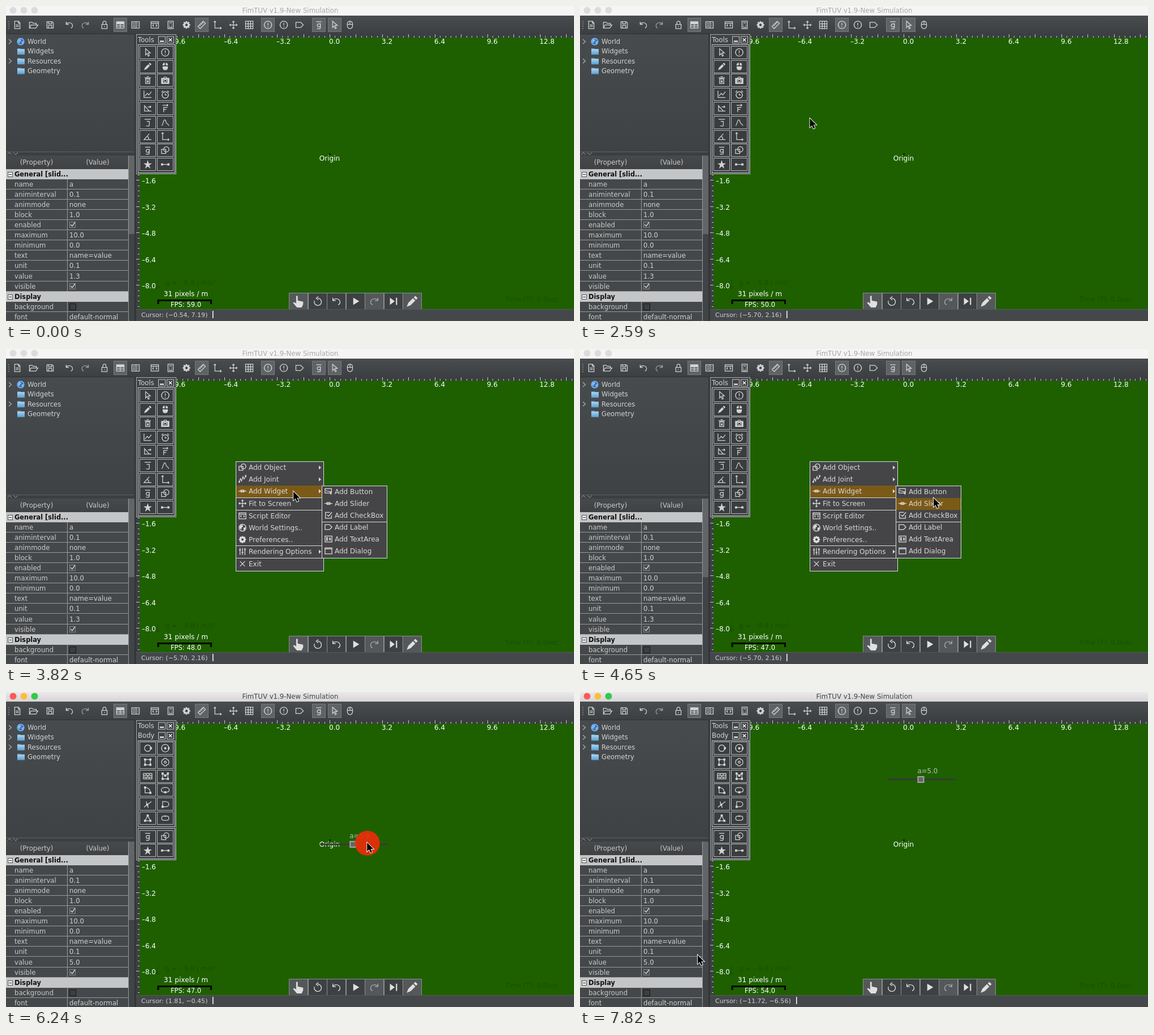
Write an HTML page with a canvas that moves like this. It is 1004 by 558 pixels and loops after 8 s.

```html
<!DOCTYPE html>
<html lang="en">
<head>
<meta charset="utf-8">
<title>Simulation editor</title>
<style>
html, body { margin: 0; width: 100%; height: 100%; overflow: hidden; background: #1e6000; }
canvas { display: block; }
</style>
</head>
<body>
<canvas id="stage" width="1004" height="558"></canvas>
<script>
const ctx = document.getElementById('stage').getContext('2d');
const LOOP = 8000, W = 1004, H = 558;
const SCALE = 29.06, OX = 572, OY = 262;
const GREEN = '#1e6000', PANEL = '#414446', LIGHT = '#d2d3d3', LINE = '#98999a';
const OPEN_MENU = 3080, OPEN_SUB = 3700, CREATE = 4860, VALUE_SET = 5240;

// Icons on a 16 by 16 grid: stroked path, then filled path.
const ICONS = {
  file: ['M3 1h7l3 3v11H3zM10 1v4h3M5 8h6M5 11h6'],
  open: ['M1 14V3h5l2 2h6v3M1 14l3-6h13l-4 6z'],
  save: ['M2 2h10l2 2v10H2zM5 2v4h6V2M5 14V9h6v5'],
  undo: ['M2 2v5h5M2 7C5 2 14 3 14 10c0 2-1 3-3 4'],
  lock: ['M3 7h10v8H3zM5 7V4a3 3 0 0 1 6 0v3M8 10v2'],
  table: ['M1 2h14v12H1zM1 6h14M1 10h14M8 6v8', 'M1 2h14v4H1z'],
  layout: ['M1 2h14v12H1zM9 2v12M3 5h4M3 8h4M3 11h4M11 6h2M11 10h2'],
  script: ['M1 2h14v12H1zM1 5h14M6 7l-2 2 2 2M10 7l2 2-2 2'],
  calc: ['M3 1h10v14H3zM5 4h6M5 8h1.5M9.5 8H11M5 11h1.5M9.5 11H11M5 13h6'],
  gear: ['M8 4a4 4 0 1 0 .01 0M8 1v3M8 12v3M1 8h3M12 8h3M3 3l2 2M13 13l-2-2M13 3l-2 2M3 13l2-2'],
  ruler: ['M1 11L11 1l4 4L5 15zM4 8l2 2M6.5 5.5l2 2M9 3l2 2'],
  axes: ['M3 1v13h12M1 3l2-2 2 2M13 12l2 2-2 2'],
  move: ['M8 1v14M1 8h14M6 3l2-2 2 2M6 13l2 2 2-2M3 6L1 8l2 2M13 6l2 2-2 2'],
  grid: ['M1 1h14v14H1zM1 6h14M1 10.5h14M6 1v14M10.5 1v14'],
  info: ['M8 1a7 7 0 1 0 .01 0M8 4v5M8 11v1.5'],
  tag: ['M1 3h9l5 5-5 5H1z'],
  g: ['M3 2h10M11 5v8c0 3-6 3-6 1M11 8c0-3-6-3-6 1s6 3 6 0'],
  pointer: ['M4 1v12l3-3 2 5 2-1-2-5h4z'],
  mouse: ['M8 1C4 1 3 4 3 8s1 7 5 7 5-3 5-7-1-7-5-7M3 7h10M8 1v6'],
  mouseFull: ['', 'M7 1C4 1 3 3 3 6h4zM9 1c3 0 4 2 4 5H9zM3 8h10c0 5-1 7-5 7s-5-2-5-7'],
  pencil: ['', 'M1 15l2-5 6-6 3 3-6 6zM10 3l2-2 3 3-2 2z'],
  trash: ['M2 3h12M6 1h4M6 8l4 4M10 8l-4 4M4 5v9h8V5z', 'M4 5h8v1H4z'],
  camera: ['M8 6a2.5 2.5 0 1 0 .01 0M1 4h4l1-2h4l1 2h4v10H1z', 'M1 4h14v2H1zM1 5h3v9H1zM12 5h3v9h-3zM1 12h14v2H1z'],
  chart: ['M1 1v13h14M3 11l4-5 3 3 5-6'],
  clock: ['M8 3a6 6 0 1 0 .01 0M8 6v3h3M1 4l3-3M15 4l-3-3'],
  push: ['M2 3v10h9zM6 13h9M8 5h6M12 3l2 2-2 2'],
  F: ['M3 2h10M11 0l2 2-2 2M5 15V6h7M5 10h5'],
  J: ['M2 2h12M6 6h5v7c0 3-5 2-6 1'],
  curve: ['M1 14c3 0 3-11 6-11s2 7 4 7 2 3 4 4'],
  angle: ['M15 14H1L11 3M7 8c3 1 3 3 3 6'],
  shapes: ['M1 6h8v8H1zM10 1a5 5 0 1 0 .01 0'],
  star: ['', 'M8 0l2 6h6l-5 3.5 2 6.5-5-4-5 4 2-6.5L0 6h6z'],
  rod: ['M2 8h12', 'M0 6h4v4H0zM12 6h4v4h-4z'],
  disc: ['M8 2a6 6 0 1 0 .01 0', 'M12 6h4v4h-4z'],
  ring: ['M8 1a7 7 0 1 0 .01 0', 'M6 6h4v4H6zM13 6h3v4h-3z'],
  rect: ['M3 3h10v10H3z', 'M1 1h4v4H1zM11 1h4v4h-4zM1 11h4v4H1zM11 11h4v4h-4z'],
  cog: ['M8 6a2 2 0 1 0 .01 0M6 1h4l1 2 3 1 1 4-1 4-3 1-1 2H6l-1-2-3-1-1-4 1-4 3-1z'],
  bricks: ['M0 3h16v10H0zM0 6.5h16M0 10h16M5 3v3.5M11 3v3.5M8 6.5v3.5M5 10v3M11 10v3'],
  poly: ['M3 3l5 4 5-4v10H3z', 'M1 1h4v4H1zM11 1h4v4h-4zM1 11h4v4H1zM11 11h4v4h-4zM6 5h4v4H6z'],
  sector: ['M3 3c6 0 10 4 10 10H3z', 'M1 1h4v4H1zM11 11h4v4h-4z'],
  ellipse: ['M8 3C-2 3-2 12 8 12s10-9 0-9', 'M6 10h4v4H6z'],
  spline: ['M1 14C5 10 9 8 15 3M5 3l4 12', 'M5 7h4v4H5z'],
  dee: ['M3 3h5c9 0 9 10 0 10H3z', 'M1 11h4v4H1z'],
  tri: ['M8 3l5 10H3z', 'M6 1h4v4H6zM11 11h4v4h-4zM1 11h4v4H1z'],
  capsule: ['M5 4h6c5 0 5 8 0 8H5c-5 0-5-8 0-8', 'M6 3h4v2H6z'],
  spring: ['M1 14l3-7 2 5 3-9 2 5 4-6', 'M0 12h3v3H0zM13 0h3v3h-3z'],
  slider: ['M0 8h16M5 6h6v4H5z'],
  globe: ['M8 1a7 7 0 1 0 .01 0', 'M3 4l5-2 1 4-3 2v4L2 9zM10 8l5-1-3 6-2-1z'],
  levels: ['M3 1v14M8 1v14M13 1v14M1 5h4M6 10h4M11 4h4'],
  cross: ['M3 3l10 10M13 3L3 13'],
  check: ['M14 8v6H2V2h9M5 7l3 3 7-8'],
  button: ['M1 2h13v9H1zM7 7l6 2-2 2 3 3M3 5l3 3'],
  area: ['M1 2h14v12H1zM4 5h2v6H4zM10 5v6M12 5v6'],
  dialog: ['M1 2h14v12H1zM1 4h14'],
  reset: ['M8 3a6 6 0 1 1-5.5 4M9 0L5.5 3 9 6'],
  play: ['', 'M4 2l10 6-10 6z'],
  next: ['', 'M2 2l8 6-8 6zM12 2h2v12h-2z'],
  hand: ['', 'M5 1.5c1-1 2-.5 2 .5v5l7 1.5V12l-2 4H6L1 10c1-1 2-1 4 1z']
};
for (const k in ICONS) ICONS[k] = ICONS[k].map(d => new Path2D(d));

function rect(x, y, w, h, color) {
  ctx.fillStyle = color;
  ctx.fillRect(x, y, w, h);
}

function frame(x, y, w, h, color, fill) {
  if (fill) rect(x, y, w, h, fill);
  ctx.strokeStyle = color;
  ctx.lineWidth = 1;
  ctx.strokeRect(x + .5, y + .5, w - 1, h - 1);
}

function line(color, width, ...pts) {
  ctx.strokeStyle = color;
  ctx.lineWidth = width;
  ctx.beginPath();
  for (let i = 0; i < pts.length; i += 2) ctx.lineTo(pts[i], pts[i + 1]);
  ctx.stroke();
}

function disc(x, y, r, color) {
  ctx.fillStyle = color;
  ctx.beginPath();
  ctx.arc(x, y, r, 0, 7);
  ctx.fill();
}

function gradient(x, y, w, h, top, bottom) {
  const g = ctx.createLinearGradient(0, y, 0, y + h);
  g.addColorStop(0, top);
  g.addColorStop(1, bottom);
  rect(x, y, w, h, g);
}

function text(s, x, y, color = '#fff', size = 11.7, align = 'left', weight = '') {
  ctx.font = `${weight} ${size}px "DejaVu Sans", sans-serif`;
  ctx.textAlign = align;
  ctx.fillStyle = color;
  ctx.fillText(s, x, y + 4.2);
  return ctx.measureText(s).width;
}

function icon(name, x, y, size = 15, color = LIGHT, flip = 1) {
  const [stroke, fill] = ICONS[name], k = size / 16;
  ctx.save();
  ctx.translate(x, y);
  ctx.scale(k * flip, k);
  ctx.translate(-8, -8);
  ctx.strokeStyle = ctx.fillStyle = color;
  ctx.lineWidth = (name === 'gear' ? 3 : 1.25) / k;
  ctx.stroke(stroke);
  if (fill) ctx.fill(fill);
  ctx.restore();
}

// Pointer path: time, x, y.
const PATH = [
  [880, 418, 369], [1000, 413, 369], [1240, 413, 369], [1600, 305.5, 256], [1760, 293, 251],
  [1990, 268, 247], [2060, 268, 247], [2590, 406.4, 199.2], [3290, 406.4, 199.2],
  [3530, 446, 219], [3700, 468, 247], [3800, 500, 252], [4060, 602, 256], [4410, 602, 256],
  [4600, 625, 264], [5200, 625, 264], [5300, 624.6, 275], [5600, 641, 296], [6030, 641, 296],
  [6760, 627.5, 152], [6980, 627.5, 152], [7500, 231.4, 452.6], [7640, 208, 466], [8000, 208, 466]
];

// Monotone cubic between the path points.
function pointer(t) {
  const last = PATH.length - 1;
  t = Math.max(PATH[0][0], Math.min(t, LOOP));
  let i = 0;
  while (i < last - 1 && PATH[i + 1][0] <= t) i++;
  const a = PATH[i], b = PATH[i + 1], dt = b[0] - a[0], u = (t - a[0]) / dt;
  const slope = (j, c) => j < 0 || j >= last ? 0 : (PATH[j + 1][c] - PATH[j][c]) / (PATH[j + 1][0] - PATH[j][0]);
  const tangent = (j, c) => {
    const p = slope(j - 1, c), q = slope(j, c);
    return p * q > 0 ? 2 * p * q / (p + q) : 0;
  };
  return [1, 2].map(c => {
    const m0 = tangent(i, c) * dt, m1 = tangent(i + 1, c) * dt, d = b[c] - a[c];
    return a[c] + u * (m0 + u * (3 * d - 2 * m0 - m1 + u * (m0 + m1 - 2 * d)));
  });
}

// The status line follows the pointer only over the free canvas.
const TRACKED = [[880, 1600], [2180, 2760], [5240, 5300], [7040, 7500]];
const num = v => v.toFixed(2).replace('-', '\u2212');

function status(t) {
  const span = TRACKED.filter(s => s[0] <= t).pop();
  if (!span) return `Cursor: (${num(-.54)}, 7.19)`;
  const [x, y] = pointer(Math.min(t, span[1]));
  return `Cursor: (${num((x - OX) / SCALE)}, ${num((OY - y) / SCALE)})`;
}

const FPS = [[0, 59], [710, 57], [940, 55], [1240, 53], [1640, 51], [2200, 50], [2820, 49], [3590, 48],
  [4410, 47], [5000, 45], [5500, 44], [6120, 47], [6500, 51], [7100, 53], [7710, 55], [7820, 54]];

const CLICKS = [[2760, 3080], [4700, 4860], [5800, 6890]];

function pressRadius(t) {
  for (const [down, up] of CLICKS) {
    if (t >= down && t < up + 250) return 22 * Math.min(1, (t - down + 40) / 100, 1 - (t - up) / 250);
  }
  return 0;
}

function titleBar(active) {
  if (active) gradient(0, 0, W, 17, '#ebe9eb', '#d6d4d6');
  else rect(0, 0, W, 17, '#f5f5f5');
  const lights = active ? ['#fc5b57', '#fdbc40', '#34c84a'] : ['#dcdcdc', '#dcdcdc', '#dcdcdc'];
  lights.forEach((c, i) => disc(12.5 + 19 * i, 7.5, 6, c));
  text('FimTUV v1.9-New Simulation', 502.5, 8, active ? '#444' : '#a8a8a8', 11.75, 'center');
}

const TOOLBAR = [
  ['file', 20], ['open', 48], ['save', 78], ['undo', 112], ['undo', 140, 0, -1], ['lock', 174],
  ['table', 202, 1], ['layout', 229], ['script', 263], ['calc', 291], ['gear', 319], ['ruler', 346, 1],
  ['axes', 374], ['move', 402], ['grid', 430], ['info', 463, 1], ['info', 491], ['tag', 519],
  ['g', 553, 1], ['pointer', 581, 1], ['mouse', 608]
];

function toolBar() {
  gradient(0, 17, W, 33, '#4a4d4f', '#3c3f41');
  for (let y = 27; y < 42; y += 4) rect(4, y, 2, 1.5, '#85888a');
  for (const [name, x, on, flip] of TOOLBAR) {
    if (on) frame(x - 12, 21, 24, 25, '#777a7c', '#606365');
    icon(name, x, 33.5, 15, flip ? '#a0a2a3' : LIGHT, flip);
  }
}

function tree(hasWidget) {
  gradient(0, 50, 227, 208, '#484b4d', '#3f4244');
  rect(0, 49, 228, 1, '#2f3233');
  ['World', 'Widgets', 'Resources', 'Geometry'].forEach((s, i) => {
    const y = 63 + 17.2 * i;
    text(s, 38, y, LIGHT, 11.6);
    if (i % 2 === 0 || (i === 1 && hasWidget)) line('#a5a7a8', 1.4, 5, y - 4, 9.5, y, 5, y + 4);
    if (i) {
      rect(20, y - 5, 6, 3, '#5d9fd0');
      gradient(20, y - 4, 13, 10, '#a9d5f2', '#5a9fd3');
    } else {
      disc(26, y, 7, '#2f72c4');
      icon('globe', 26, y, 13, '#8fbbe0');
    }
  });
}

function properties(value) {
  rect(0, 258, 228, 300, '#3c3f41');
  rect(0, 258, 227, 1, '#606365');
  line('#a5a7a8', 1, 2, 263.5, 6, 259.5, 10, 263.5);
  line('#a5a7a8', 1, 13, 259.5, 17, 263.5, 21, 259.5);
  gradient(0, 265, 217, 24, '#47494b', '#3f4244');
  text('(Property)', 54, 277, '#c9caca', 11.7, 'center');
  text('(Value)', 162, 277, '#c9caca', 11.7, 'center');
  const rows = ['*General [slid...', 'name', 'animinterval', 'animmode', 'block', 'enabled', 'maximum', 'minimum',
    'text', 'unit', 'value', 'visible', '*Display', 'background', 'font'];
  const values = { name: 'a', animinterval: '0.1', animmode: 'none', block: '1.0', maximum: '10.0', minimum: '0.0',
    text: 'name=value', unit: '0.1', value, font: 'default-normal' };
  rows.forEach((s, i) => {
    const top = Math.round(288.5 + 18.1 * i), y = top + 9;
    if (s[0] === '*') {
      rect(0, top, 217, 18, '#c4c5c6');
      frame(3, y - 4, 9, 9, '#555', '#eee');
      rect(5, y, 5, 1, '#222');
      text(s.slice(1), 15, y, '#111', 11.4, 'left', 'bold');
      return;
    }
    rect(0, top, 217, 18, '#45484a');
    rect(0, top + 17, 217, 1, LINE);
    rect(108, top, 1, 18, LINE);
    text(s, 15, y, '#c9caca');
    if (s === 'background') frame(112, y - 6, 12, 12, '#111', '#3c3f41');
    else if (values[s]) text(values[s], 112, y, '#d0d1d1');
    else {
      frame(112, y - 6, 11, 11, '#85888a', '#484b4d');
      line(LIGHT, 1.4, 114, y - 1, 117, y + 2, 122, y - 5);
    }
  });
  rect(216, 265, 1, 293, LINE);
  rect(217, 265, 10, 293, '#414446');
  rect(217, 265, 10, 139, '#626567');
  rect(227, 50, 3, 508, '#333638');
}

function world() {
  rect(230, 50, W - 230, 487, GREEN);
  rect(230, 49, W - 230, 7, '#3c3f41');
  rect(230, 49, 6, 488, '#3c3f41');
  const step = SCALE * .32;
  for (let i = -36; i < 48; i++) {
    const h = i % 5 ? 3 : 6, x = Math.round(OX + i * step);
    if (x > 236) rect(x, 56 - h, 1, h, '#c8caca');
    const y = Math.round(OY + i * step);
    if (y > 58 && y < 536) rect(236 - h, y, h, 1, '#c8caca');
  }
  const minus = v => v.toFixed(1).replace('-', '\u2013');
  for (let i = -3; i < 5; i++) text(minus(i * 3.2), OX + i * 3.2 * SCALE - 1, 63, '#fff', 12);
  for (let i = 1; i < 6; i++) text(minus(-1.6 * i), 265, OY + i * 1.6 * SCALE + 1.5, '#fff', 12, 'right');
  rect(571, 261, 3, 3, '#0a2600');
  text('Origin', 572, 270, '#fff', 12.1, 'center');

  const dim = '#184f00';
  line(dim, 1.2, 268, 484, 268, 501);
  line(dim, 1.2, 264, 496, 268, 501, 272, 496);
  text('g = - 9.8 j m/s\u00b2', 281, 490, dim, 12);
  text('Time (T): 0.0sec', 882, 520, dim, 11.7);
}

function scaleBar(t) {
  text('31 pixels / m', 318, 510, '#fff', 12.2, 'center');
  line('#000', 3, 269, 528, 269, 521.5, 362.5, 521.5, 362.5, 528);
  const fps = FPS.filter(f => f[0] <= t).pop()[1];
  text(`FPS: ${fps}.0`, 318, 529, '#fff', 11.5, 'center');
}

function playBar(focus) {
  ['hand', 'reset', 'undo', 'play', 'undo', 'next', 'pencil'].forEach((name, i) => {
    const x = Math.round(500 + 33.5 * i), lit = i === 0 || i === 4 || i === 6;
    frame(x, 508, 34, 30, '#8b8d8e', lit ? '#55585a' : '#3e4143');
    const big = i === 0 || i === 6;
    icon(name, x + 17, 523, big ? 22 : 17, i === 4 ? '#a9abac' : '#e0e0e0', i === 4 ? -1 : 1);
  });
  if (!focus) return;
  ctx.setLineDash([1, 1]);
  frame(502, 510, 30, 26, '#fff');
  ctx.setLineDash([]);
}

function statusBar(t) {
  rect(230, 537, W - 230, 21, '#45484a');
  rect(230, 537, W - 230, 1, '#55585a');
  const w = text(status(t), 239, 547, '#d0d1d1', 11.05);
  rect(Math.round(239 + w + 9), 540, 1.5, 13, '#fff');
}

const TOOLS = ['pointer', 'info', 'pencil', 'mouseFull', 'trash', 'camera', 'chart', 'clock', 'push', 'F',
  'J', 'curve', 'angle', 'axes', 'g', 'shapes', 'star', 'rod'];
const BODY = ['disc', 'ring', 'rect', 'cog', 'bricks', 'poly', 'sector', 'ellipse', 'spline', 'dee', 'tri', 'capsule'];

function paletteTitle(s, y) {
  text(s, 233, y, LIGHT, 11.7);
  frame(269, y - 6, 13, 13, '#c4c5c6', PANEL);
  rect(272, y + 2, 7, 2, '#fff');
  frame(284, y - 6, 13, 13, '#c4c5c6', PANEL);
  icon('cross', 290.5, y + .5, 9, '#fff');
}

function cells(names, top) {
  names.forEach((name, i) => {
    const x = 236 + 31 * (i % 2), y = top + 24.8 * (i >> 1);
    frame(x, Math.round(y - 11.5), 29, 23, '#b0b1b2', '#3a3d3f');
    icon(name, x + 14.5, y, 15);
  });
}

function palette(body) {
  frame(230, 50, 71, 248, '#a9abac', PANEL);
  paletteTitle('Tools', 59.5);
  if (body) {
    paletteTitle('Body', 77);
    frame(233, 86, 66, 153, '#c4c5c6');
    cells(BODY, 99.5);
    frame(233, 241, 66, 55, '#c4c5c6');
    cells(TOOLS.slice(14), 256);
  } else {
    frame(233, 68, 66, 228, '#c4c5c6');
    cells(TOOLS, 82.2);
  }
}

// Menu rows: label, icon, center, opens a submenu.
const MENU = [['Add Object', 'shapes', 210, 1], ['Add Joint', 'spring', 231, 1], ['Add Widget', 'slider', 252, 1],
  ['Fit to Screen', 'move', 274], ['Script Editor', 'script', 296], ['World Settings..', 'globe', 317],
  ['Preferences..', 'gear', 338], ['Rendering Options', 'levels', 359, 1], ['Exit', 'cross', 381]];
const SUBMENU = [['Add Button', 'button', 253], ['Add Slider', 'slider', 274], ['Add CheckBox', 'check', 295],
  ['Add Label', 'tag', 316], ['Add TextArea', 'area', 337], ['Add Dialog', 'dialog', 358]];

function menu(rows, x, y, w, h, rules, hot) {
  rect(x, y, w, h, '#454547');
  rows.forEach(([label, name, cy, more], i) => {
    if (i === hot) rect(x + 1, cy - 10, w - 2, 21, '#7b5a18');
    icon(name, x + 12, cy - .5, 14, '#dedede');
    text(label, x + 23, cy, '#d8d8d8', 12);
    if (!more) return;
    ctx.fillStyle = '#dedede';
    ctx.beginPath();
    ctx.moveTo(x + 147, cy - 3.5);
    ctx.lineTo(x + 151, cy);
    ctx.lineTo(x + 147, cy + 3.5);
    ctx.fill();
  });
  for (const r of rules) rect(x, r, w, 1, '#dcdcdc');
  frame(x, y, w, h, '#dcdcdc');
}

function menus(t, [x, y]) {
  const sub = t >= OPEN_SUB;
  const hover = (rows, top) => y < top ? -1 : rows.findIndex(r => Math.abs(r[2] - y) <= 10.5);
  menu(MENU, 406, 199, 156, 195, [263, 285, 348, 370], sub ? 2 : t > 3330 ? hover(MENU, 199) : -1);
  if (sub) menu(SUBMENU, 558, 242, 116, 129, [306], x > 558 ? hover(SUBMENU, 242) : -1);
}

function slider(t) {
  const [x0, y0] = pointer(6000), [x1, y1] = pointer(Math.max(6000, Math.min(t, 6890)));
  const x = 616 + x1 - x0, y = 299 + y1 - y0;
  rect(x - 58, y - 1.5, 119, 3, '#363c32');
  rect(x - 6, y - 6, 12, 12, '#a2a4a2');
  rect(x - 4, y - 4, 8, 8, '#63666a');
  text('a=5.0', x - 6, y - 15.5, '#b9c4b4', 11.8);
}

function arrow(x, y) {
  const p = new Path2D('M0 0V15.5L3.6 12.2 6.2 18 8.8 16.8 6.3 11.2H11.2Z');
  ctx.save();
  ctx.translate(x, y);
  ctx.lineWidth = 1.8;
  ctx.strokeStyle = '#fff';
  ctx.stroke(p);
  ctx.fillStyle = '#000';
  ctx.fill(p);
  ctx.restore();
}

function draw(t) {
  const done = t >= CREATE, at = pointer(t);
  world();
  toolBar();
  rect(230, 49, W - 230, 1, '#3c3f41');
  titleBar(done);
  tree(done);
  properties(t >= VALUE_SET ? '5.0' : '1.3');
  scaleBar(t);
  playBar(done && t < 5800);
  statusBar(t);
  palette(done);
  if (done) slider(t);
  else if (t >= OPEN_MENU) menus(t, at);
  const r = pressRadius(t);
  if (r > 0) disc(at[0] + .5, at[1] + 1, r, 'rgba(232,46,8,.93)');
  if (t >= 880) arrow(...at);
}

const start = performance.now();
function tick() {
  draw((performance.now() - start) % LOOP);
  requestAnimationFrame(tick);
}
tick();
</script>
</body>
</html>
```
